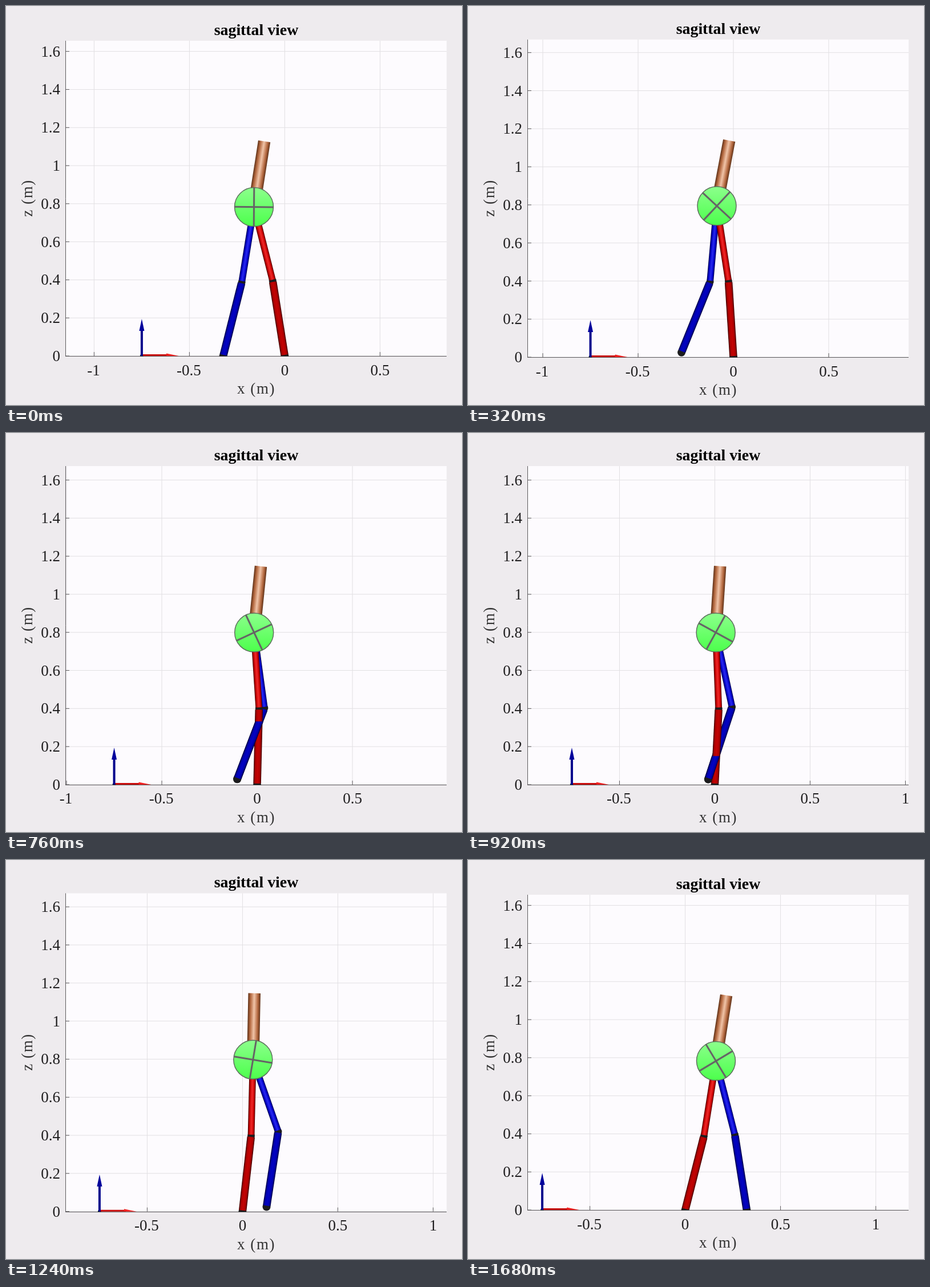
An HTML page with a canvas for the animation above (1720 ms loop, 799 by 700 pixels).

```html
<!DOCTYPE html>
<html lang="en">
<head>
<meta charset="utf-8">
<title>sagittal view</title>
<style>
  html, body { margin: 0; height: 100%; overflow: hidden; background: #eeebee; }
  canvas { display: block; }
</style>
</head>
<body>
<canvas id="stage" width="799" height="700"></canvas>
<script>
const ctx = document.getElementById('stage').getContext('2d');
const LOOP = 1720, STEP = 40;
const SCALE = 334, LINK = 133.6, KNEE_BEND = 5.1;
const LEFT = 104, RIGHT = 772;
const SERIF = '"Liberation Serif", "Times New Roman", serif';

// Poses at a few times; angles in degrees, limbs measured from straight down
const times = [0, 320, 760, 1080, 1240, 1520, 1680];
const pose = {
  hipX:       [434.5, 436, 434.7, 433.5, 432.8, 431.8, 434.5],
  stance:     [9.1, 3.7, -1.4, -4.5, -6.5, -11.1, -14.2],
  swingThigh: [-9.2, -5.1, 7.8, 16.3, 19.3, 19.8, 14.3],
  swingShank: [-14.1, -22, -20.9, -14.2, -8.8, 3.2, 9],
  lean:       [8.9, 10.7, 5.8, 2, 1.2, 6.9, 8.9],
  spin:       [0.5, -137, -295, -373, -440.5, -581, -661]
};

const RED_THIGH = ['#4a0000', '#c40000', '#f02a2a', '#cc0000', '#4a0000'];
const RED_SHANK = ['#3a0000', '#ac0000', '#c40404', '#ac0000', '#3a0000'];
const BLUE_THIGH = ['#00004a', '#0000c4', '#2a2af0', '#0000cc', '#00004a'];
const BLUE_SHANK = ['#00003a', '#0000ac', '#0404c4', '#0000ac', '#00003a'];
const COPPER = ['#5f3219', '#b4683f', '#f0c4a8', '#b4683f', '#5f3219'];

const rad = deg => deg * Math.PI / 180;

// Cubic Hermite curve through the keys
function sample(keys, t) {
  const last = times.length - 1;
  const slope = i => (keys[i + 1] - keys[i]) / (times[i + 1] - times[i]);
  const tangent = i => {
    if (i === 0) return 1.5 * slope(0) - 0.5 * tangent(1);
    if (i === last) return 1.5 * slope(last - 1) - 0.5 * tangent(last - 1);
    const before = times[i] - times[i - 1], after = times[i + 1] - times[i];
    return (slope(i - 1) * after + slope(i) * before) / (before + after);
  };
  let i = 0;
  while (i < last - 1 && t >= times[i + 1]) i++;
  const h = times[i + 1] - times[i], u = (t - times[i]) / h, v = 1 - u;
  return v * v * ((1 + 2 * u) * keys[i] + u * h * tangent(i))
       + u * u * ((1 + 2 * v) * keys[i + 1] - v * h * tangent(i + 1));
}

const along = (p, deg, length) => ({
  x: p.x + length * Math.sin(rad(deg)),
  y: p.y + length * Math.cos(rad(deg))
});

function line(x1, y1, x2, y2, color, width = 1) {
  ctx.strokeStyle = color;
  ctx.lineWidth = width;
  ctx.beginPath();
  ctx.moveTo(x1, y1);
  ctx.lineTo(x2, y2);
  ctx.stroke();
}

function disc(p, r, fill) {
  ctx.fillStyle = fill;
  ctx.beginPath();
  ctx.arc(p.x, p.y, r, 0, 2 * Math.PI);
  ctx.fill();
}

function polygon(fill, ...points) {
  ctx.fillStyle = fill;
  ctx.beginPath();
  points.forEach(([x, y]) => ctx.lineTo(x, y));
  ctx.fill();
}

function text(str, x, y, font, color, align = 'center') {
  ctx.font = `${font} ${SERIF}`;
  ctx.fillStyle = color;
  ctx.textAlign = align;
  ctx.fillText(str, x, y);
}

// Shaded cylinder seen from the side
function rod(p, deg, from, to, width, colors) {
  const shade = ctx.createLinearGradient(-width / 2, 0, width / 2, 0);
  [0, 0.2, 0.5, 0.8, 1].forEach((stop, i) => shade.addColorStop(stop, colors[i]));
  ctx.save();
  ctx.translate(p.x, p.y);
  ctx.rotate(-rad(deg));
  ctx.fillStyle = shade;
  ctx.fillRect(-width / 2, from, width, to - from);
  ctx.restore();
}

function shank(leg) {
  disc(leg.foot, 7, '#1c1c1e');
  rod(leg.knee, leg.shankDeg, 2, LINK - 2, 13.5, leg.shankColors);
}

function drawLeg(leg) {
  disc(leg.knee, 6.5, '#1c1c1e');
  rod(leg.hip, leg.thighDeg, 0, LINK - 2, 11.8, leg.thighColors);
  shank(leg);
}

function makeLeg(hip, thighDeg, shankDeg, thighColors, shankColors) {
  const knee = along(hip, thighDeg, LINK);
  return { hip, knee, foot: along(knee, shankDeg, LINK), thighDeg, shankDeg, thighColors, shankColors };
}

function drawAxes(ox, oy, top) {
  const bottom = Math.round(oy) + 0.5;
  ctx.fillStyle = '#fdfbfe';
  ctx.fillRect(LEFT, top, RIGHT - LEFT, oy - top);

  const xTicks = [-1, -0.5, 0, 0.5, 1]
    .map(v => ({ v, x: ox + v * SCALE }))
    .filter(({ x }) => x >= LEFT && x <= RIGHT);
  const zTicks = Array.from({ length: 9 }, (_, i) => ({ v: i / 5, y: oy - i / 5 * SCALE }));

  xTicks.forEach(({ x }) => line(x, top, x, oy, '#e2e0e3'));
  zTicks.forEach(({ y }) => line(LEFT, y, RIGHT, y, '#e2e0e3'));
  line(LEFT + 0.5, top, LEFT + 0.5, bottom, '#5c5a5c');
  line(LEFT, bottom, RIGHT, bottom, '#5c5a5c');
  xTicks.forEach(({ v, x }) => {
    line(x, oy, x, oy - 7, '#5c5a5c');
    text(String(v), x - (v < 0 ? 1 : 0), oy + 33.5, '27px', '#201f20');
  });
  zTicks.forEach(({ v, y }) => {
    line(LEFT, y, LEFT + 7, y, '#5c5a5c');
    text(String(v), 95, y + 9, '27px', '#201f20', 'right');
  });

  text('sagittal view', 438.5, top - 10, 'bold 27.8px', '#000');
  ctx.letterSpacing = '1.6px';
  text('x (m)', 438.5, oy + 66, '27px', '#333');
  ctx.save();
  ctx.translate(46, 337);
  ctx.rotate(-Math.PI / 2);
  text('z (m)', 0, 0, '27px', '#333');
  ctx.restore();
  ctx.letterSpacing = '0px';
}

function drawArrows(x, y) {
  disc({ x, y }, 3, '#0a2a14');
  line(x, y - 1.5, x + 46, y - 1.5, '#c80c0c', 3);
  polygon('#f02020', [x + 43, y], [x + 43, y - 4.5], [x + 65, y]);
  line(x, y, x, y - 46, '#00008c', 4);
  polygon('#00009c', [x - 4.5, y - 44], [x, y - 65], [x + 4.5, y - 44]);
}

function drawBall(p, spin) {
  const r = 34;
  const shade = ctx.createLinearGradient(0, p.y - r, 0, p.y + r);
  shade.addColorStop(0, '#8cff8c');
  shade.addColorStop(1, '#4cff4c');
  disc(p, r, shade);
  ctx.save();
  ctx.translate(p.x, p.y);
  ctx.rotate(rad(spin));
  line(-r, 0, r, 0, '#666466', 3);
  line(0, -r, 0, r, '#666466', 3);
  ctx.restore();
  ctx.strokeStyle = '#5c6e5c';
  ctx.lineWidth = 1.5;
  ctx.beginPath();
  ctx.arc(p.x, p.y, r, 0, 2 * Math.PI);
  ctx.stroke();
}

function draw(t) {
  const at = name => sample(pose[name], t);
  const s = at('stance'), thigh = s + KNEE_BEND;

  // The planted foot is the origin; the view follows the body
  const reach = along(along({ x: 0, y: 0 }, s, LINK), thigh, LINK);
  const oy = 617 - (267 - reach.y) * 0.53;
  const hip = { x: at('hipX'), y: oy - reach.y };
  const ox = hip.x + reach.x;
  const top = 675 - oy;

  ctx.fillStyle = '#eeebee';
  ctx.fillRect(0, 0, 799, 700);
  drawAxes(ox, oy, top);

  ctx.save();
  ctx.beginPath();
  ctx.rect(LEFT, top, RIGHT - LEFT, oy - top + 0.5);
  ctx.clip();
  drawArrows(ox - 0.75 * SCALE, oy);

  const red = makeLeg(hip, thigh, s, RED_THIGH, RED_SHANK);
  const blue = makeLeg(hip, at('swingThigh'), at('swingShank'), BLUE_THIGH, BLUE_SHANK);
  drawLeg(blue);
  drawLeg(red);

  // Below the point where the shanks cross, blue is in front
  const kneeGap = blue.knee.x - red.knee.x, footGap = blue.foot.x - red.foot.x;
  if (kneeGap > 0 && footGap < 0) {
    const crossY = red.knee.y + LINK * kneeGap / (kneeGap - footGap) - 6;
    ctx.save();
    ctx.beginPath();
    ctx.rect(LEFT, crossY, RIGHT - LEFT, oy - crossY);
    ctx.clip();
    shank(blue);
    ctx.restore();
  }

  rod(hip, 180 - at('lean'), 0, 116.7, 21.5, COPPER);
  drawBall(hip, at('spin'));
  ctx.restore();
}

const start = performance.now();
function frame() {
  const t = (performance.now() - start) % LOOP;
  draw(Math.floor(t / STEP) * STEP);
  requestAnimationFrame(frame);
}
frame();
</script>
</body>
</html>
```
